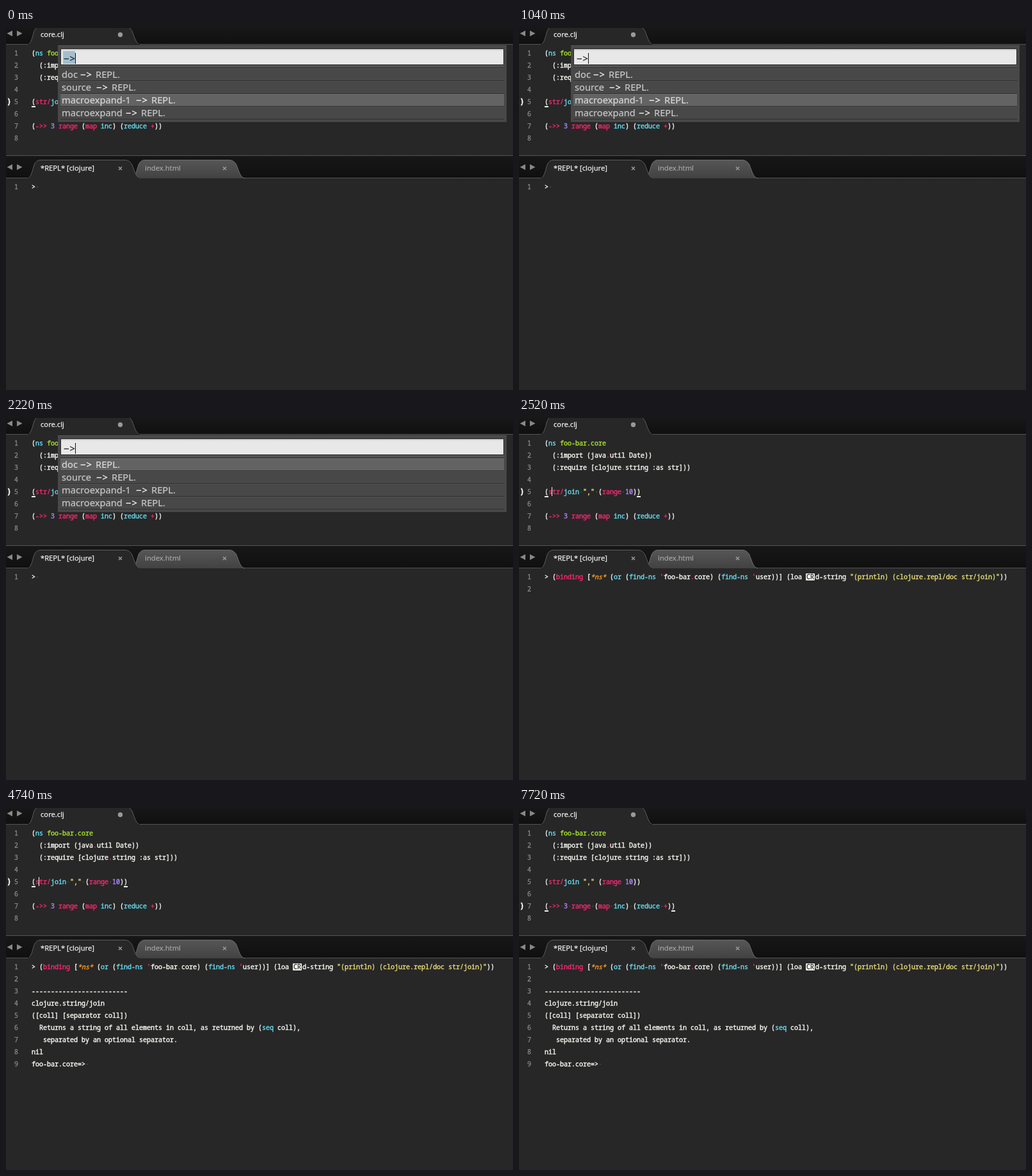
Recreate the animation shown at these times as an HTML page. Size 792 px wide and 566 px high, loop 8000 ms.

```html
<!DOCTYPE html>
<html lang="en">
<head>
<meta charset="utf-8">
<title>Clojure REPL</title>
<style>
  html, body { margin: 0; width: 100%; height: 100%; overflow: hidden; background: #272727; }
  svg { display: block; }
  text, tspan { white-space: pre; fill: currentColor; stroke: currentColor; }
  .code { font: 500 10px "Noto Sans Mono", monospace; color: #f8f8f2; stroke-width: .42px; }
  .num { color: #8f908a; stroke-width: .25px; }
  .mark { font-size: 12.5px; font-weight: 700; }
  .b { color: #66d9ef; }
  .g { color: #a6e22e; }
  .p { color: #f92672; }
  .v { color: #ae81ff; }
  .y { color: #e6db74; }
  .o { color: #fd971f; font-style: italic; }
  .key { color: #272727; stroke-width: .3px; }
  .tab { font: 11.2px "Noto Sans", sans-serif; color: #ececec; stroke-width: .25px; }
  .tab.idle { color: #a9a9a9; stroke-width: .15px; }
  .pick { font: 14.7px "Noto Sans", sans-serif; color: #c8c8c8; word-spacing: .6px; stroke-width: .2px; }
  .pick.on { color: #d8d8d8; }
  .wide { letter-spacing: .9px; }
  .match { color: #fff; }
  .pick.query { color: #222; }
</style>
</head>
<body>
<svg id="stage" width="792" height="566" viewBox="0 0 792 566">
  <defs>
    <linearGradient id="bar" x2="0" y2="1">
      <stop stop-color="#171717"/><stop offset="1" stop-color="#101010"/>
    </linearGradient>
    <linearGradient id="idle" x2="0" y2="1">
      <stop stop-color="#565656"/><stop offset="1" stop-color="#424242"/>
    </linearGradient>
    <linearGradient id="field" x2="0" y2="1">
      <stop stop-color="#cfcfcf"/><stop offset=".15" stop-color="#e8e8e8"/><stop offset="1" stop-color="#e8e8e8"/>
    </linearGradient>
    <clipPath id="list"><rect x="81" y="60" width="701" height="129"/></clipPath>
  </defs>
  <rect width="792" height="566" fill="#272727"/>
  <g id="frame"></g>
  <g id="editor"></g>
  <g id="repl"></g>
  <g id="panel"></g>
</svg>
<script>
const LOOP = 8000, LEFT = 40, CHAR = 6, LINE = 19;
const $ = id => document.getElementById(id);
const rect = (x, y, w, h, fill, extra = '') =>
  `<rect x="${x}" y="${y}" width="${w}" height="${h}" fill="${fill}" ${extra}/>`;
const text = (x, y, cls, s) => `<text x="${x}" y="${y}" class="${cls}">${s}</text>`;

// b{word} colours a word with class b
const paint = s => s.replace(/([bgpvyo])\{(.*?)\}/g, '<tspan class="$1">$2</tspan>');
const plain = s => s.replace(/[bgpvyo]\{(.*?)\}/g, '$1');

const source = [
  '(b{ns} g{foo-bar.core}',
  '  (:import (javap{.}util Date))',
  '  (:require [clojurep{.}string :as str]))',
  '',
  '(p{str/}b{join} y{","} (p{range} v{10}))',
  '',
  '(p{->>} v{3} p{range} (p{map} b{inc}) (b{reduce} p{+}))',
  ''
];
const output = [
  "> (p{binding} [o{*ns*} (b{or} (b{find-ns} p{'}foo-barp{.}core) (b{find-ns} p{'}user))] (loa",
  '',
  '-'.repeat(25),
  'clojure.string/join',
  '([coll] [separator coll])',
  '  Returns a string of all elements in coll, as returned by (b{seq} coll),',
  '   separated by an optional separator.',
  'nil',
  'foo-bar.core=> '
];

const lines = (list, base) => list.map((s, i) =>
  text(13, base + i * LINE, 'code num', i + 1) +
  text(LEFT, base + i * LINE, 'code', paint(s))).join('');
const spaceDot = (col, y) =>
  rect(LEFT + col * CHAR + 2.5, y - 4, 1.2, 1.2, '#6a6a6a');

function tab(x, y, label, active) {
  const edge = 'M33 235C40 234 41 222 44 214Q47 206.5 54 206.5H186Q193 206.5 197 214C201 224 203 234 210 235';
  return `<g transform="translate(${x} ${y})">
    <path d="${edge}" fill="${active ? '#272727' : 'url(#idle)'}" stroke="${active ? '#5c5c5c' : '#707070'}"/>
    ${text(54, 223, active ? 'tab' : 'tab idle', label)}</g>`;
}
const cross = x => `<path d="M${x - 2.5} 217l5 5m0-5l-5 5" stroke="#999" stroke-width="1.5"/>`;
const arrows = y => `<path d="M10 ${y - 4.5}v9l-8.5-4.5zM17 ${y - 4.5}v9l8.5-4.5z" fill="#888"/>`;

$('frame').innerHTML =
  rect(0, 0, 792, 25, 'url(#bar)') + rect(0, 25, 792, 1, '#535353') +
  tab(0, -209, 'core.clj', true) + rect(34, 25, 175, 2, '#272727') +
  '<circle cx="178.5" cy="10.5" r="3.7" fill="#999"/>' + arrows(8.5) +
  rect(0, 199, 792, 1, '#555') + rect(0, 200, 792, 34, 'url(#bar)') + rect(0, 234, 792, 1, '#535353') +
  tab(163, 0, 'index.html', false) + tab(0, 0, '*REPL* [clojure]', true) +
  rect(34, 234, 175, 2, '#272727') + cross(178.5) + cross(341.5) + arrows(217.5);

function drawEditor({ line, col, alpha, panel }) {
  const y = 43 + (line - 1) * LINE, s = plain(source[line - 1]);
  let out = lines(source, 43);
  if (s) {
    out += text(1, y, 'code mark', ')');
    for (const c of [0, s.length - 1]) out += rect(LEFT + c * CHAR, y + 3, CHAR, 2, '#f8f8f2');
    if (!panel) [...s].forEach((ch, i) => { if (ch === ' ') out += spaceDot(i, y); });
  }
  if (!panel) out += rect(LEFT + col * CHAR - 1, y - 11, 1, 14, '#f8f8f0', `opacity="${alpha}"`);
  $('editor').innerHTML = out;
}

function drawRepl({ shown }) {
  if (!shown) {
    $('repl').innerHTML = lines(['> '], 252) + spaceDot(1, 252);
    return;
  }
  let out = lines(output.slice(0, shown), 252) +
    rect(448, 243, 14, 11, '#f8f8f2', 'rx="1"') + text(449, 252, 'code key', 'CR') +
    text(463, 252, 'code', paint('d-string y{"(println) (clojure.repl/doc str/join)"}))'));
  if (shown === output.length) out += spaceDot(14, 252 + 8 * LINE);
  $('repl').innerHTML = out;
}

// A choice is a list of [x, word] pairs
const command = (name, x) => [[87, name], [x, '−>'], [x + 24, 'REPL.']];
const python = mode => [[87, 'SublimeREPL: Python'], [235, '−'], [247, mode]];
const doc = command('doc', 116), src = command('source', 141);
const once = command('macroexpand-1', 203), full = command('macroexpand', 187);
const build = [[87, 'Build With: Inlein'], [206, '−'], [217, '−−'], [236, 'shutdown-daemon']];
const choices = {
  '−': [doc, once, build, src, python('IPython'), python('execnet'), python('virtualenv')],
  '−>': [doc, src, once, full]
};

function drawPanel({ panel, query, row, selected, alpha }) {
  if (!panel) return void ($('panel').innerHTML = '');
  const list = choices[query], long = list.length > 4;
  const width = long ? 677 : 693, end = query.length > 1 ? 108 : 97;
  let out = rect(81, 27, 701, long ? 166 : 120, '#484848') +
    rect(81, 27, 701, 1, '#555') +
    rect(85, 32, 693, 26, '#2c2c2c', 'rx="1"') + rect(86, 33, 691, 24, 'url(#field)') +
    rect(85, 59, 693, 1, '#646464') + rect(85, 62, 693, 1, '#383838');
  if (selected) out += rect(89, 36, 19, 20, '#a3bfcf');
  out += text(90, 53, 'pick query wide', query) +
    rect(end, 39, 1, 17, '#111', `opacity="${alpha}"`) + '<g clip-path="url(#list)">';
  list.forEach((words, i) => {
    const y = 63 + i * 20, on = i === row;
    out += rect(85, y, width, 20, on ? '#636363' : '#484848') +
      rect(85, y, width, 1, on ? '#6c6c6c' : '#525252') + rect(85, y + 19, width, 1, '#303030');
    for (const [x, word] of words) {
      const hit = word.startsWith(query);
      const label = hit ? `<tspan class="match">${query}</tspan>${word.slice(query.length)}` : word;
      out += text(x, y + 15, `pick ${on ? 'on' : ''} ${word[0] === '−' ? 'wide' : ''}`, label);
    }
  });
  out += '</g>';
  if (long) out += rect(762, 63, 16, 126, '#2d2d2d') +
    rect(765.5, 67.5, 8, 16, '#5a5a5a', 'rx="4" stroke="#777"');
  $('panel').innerHTML = out;
}

const steps = [
  [0, { panel: true, query: '−>', row: 2, selected: true, alpha: 1, line: 5, col: 2, shown: 0 }],
  [300, { alpha: .5 }],
  [450, { alpha: 0 }],
  [750, { query: '−', row: 1, selected: false, alpha: 1 }],
  [1040, { query: '−>', row: 2 }],
  [1490, { alpha: .5 }],
  [1640, { alpha: 0 }],
  [1790, { row: 1 }],
  [1930, { alpha: .5 }],
  [2080, { alpha: 1 }],
  [2220, { row: 0 }],
  [2520, { panel: false, shown: 2 }],
  [2670, { shown: 9 }],
  [2970, { alpha: .5 }],
  [3120, { alpha: 0 }],
  [3560, { alpha: .5 }],
  [3710, { alpha: 1 }],
  [4000, { alpha: .5 }],
  [4150, { alpha: 0 }],
  [4450, { alpha: .5 }],
  [4600, { alpha: 1 }],
  [4750, { line: 6, col: 0 }],
  [4890, { line: 7, col: 2 }],
  [5040, { col: 34 }],
  [5190, { alpha: .5 }],
  [5340, { alpha: 0 }],
  [5790, { alpha: .75 }],
  [5940, { alpha: 1 }],
  [6090, { line: 6, col: 0 }],
  [6240, { line: 7, col: 1 }],
  [6540, { alpha: .65 }],
  [6690, { alpha: .3 }],
  [6830, { alpha: 0 }],
  [7130, { col: 2, alpha: 1 }],
  [7430, { alpha: .65 }],
  [7580, { alpha: .3 }],
  [7720, { alpha: 0 }]
];

const start = performance.now();
let current = -1;
function tick() {
  const t = (performance.now() - start) % LOOP;
  const count = steps.filter(([at]) => at <= t).length;
  if (count !== current) {
    current = count;
    const state = Object.assign({}, ...steps.slice(0, count).map(s => s[1]));
    drawEditor(state);
    drawRepl(state);
    drawPanel(state);
  }
  requestAnimationFrame(tick);
}
tick();
</script>
</body>
</html>
```
